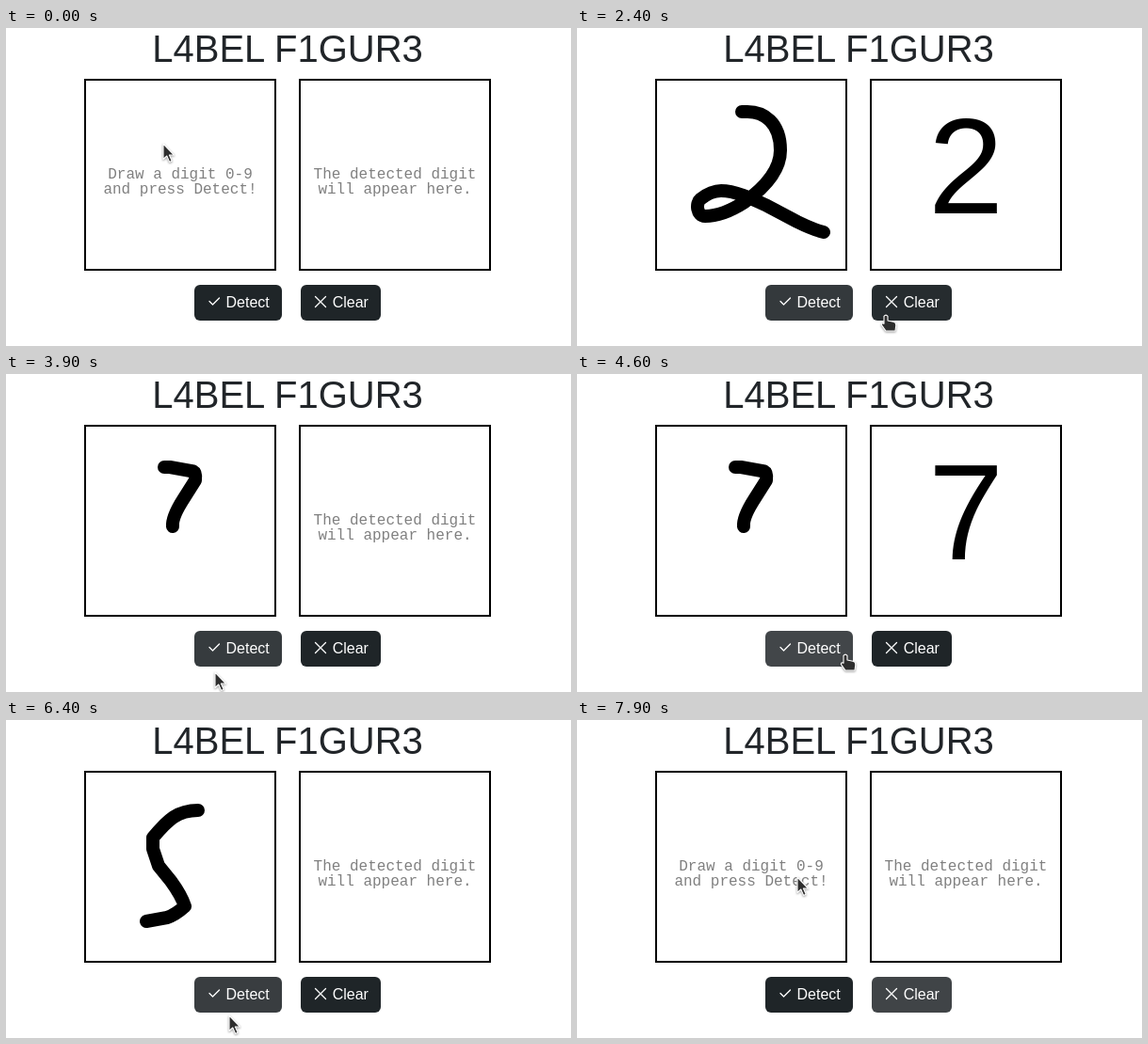
These frames come from a looping animation (600 px wide and 338 px high, 8000 ms). An HTML page:

```html
<!DOCTYPE html>
<html lang="en">
<head>
<meta charset="utf-8">
<title>Digit recognition</title>
<style>
  html, body { margin: 0; width: 100%; height: 100%; overflow: hidden; background: #fff; }
  svg { display: block; width: 100%; height: 100%; }
  text { font-family: "Liberation Sans", Arial, sans-serif; font-size: 16px; }
  .mid { text-anchor: middle; }
  .hint text { font-family: "Liberation Mono", "Courier New", monospace; fill: #808080; }
  .label { fill: #fff; }
  .icon { fill: none; stroke: #fff; stroke-width: 1.3; stroke-linecap: round; stroke-linejoin: round; }
  .box { fill: none; stroke: #000; stroke-width: 2; }
  #ink path { fill: none; stroke: #000; stroke-width: 14; stroke-linecap: round; stroke-linejoin: round; }
  #pointer path { fill: #2e2e2e; stroke: #fff; stroke-width: 1.1; stroke-linejoin: round; }
  #pointer { filter: drop-shadow(0.5px 1px 0.8px rgba(0, 0, 0, .4)); }
</style>
</head>
<body>
<svg viewBox="0 0 600 338">
  <text class="mid" x="299" y="36" fill="#212529" style="font-size:40px">L4BEL F1GUR3</text>
  <rect class="box" x="84" y="55" width="202" height="202"/>
  <rect class="box" x="312" y="55" width="202" height="202"/>

  <g id="drawHint" class="hint mid">
    <text x="185" y="160">Draw a digit 0-9</text>
    <text x="185" y="176">and press Detect!</text>
  </g>
  <g id="resultHint" class="hint mid">
    <text x="413" y="160">The detected digit</text>
    <text x="413" y="176">will appear here.</text>
  </g>
  <g id="ink"></g>
  <text id="result" class="mid" x="413" y="197" style="font-size:144px"></text>

  <rect id="detect" x="200" y="273" width="93" height="38" rx="6"/>
  <path class="icon" d="M216 290.5l3.5 3.5 7-7"/>
  <text class="label" x="233.5" y="297">Detect</text>
  <rect id="clear" x="313" y="273" width="85" height="38" rx="6"/>
  <path class="icon" d="M328.5 285.5l11 11m0-11l-11 11"/>
  <text class="label" x="346.7" y="297">Clear</text>

  <g id="pointer">
    <path id="arrow" d="M0 0V16.5L3.8 13 6.6 19.4 9.2 18.3 6.4 12H11.5Z"/>
    <path id="hand" d="M-2 1.4Q0 -1.2 2 1.4V6L8 7.3Q11 8 10.8 11L10 17H0L-4.6 10.6Q-4.8 8 -2 9.3Z"/>
  </g>
</svg>
<script>
const LOOP = 8000, STEP = 100, INK_LAG = 70, LINGER = 85, FADE = 150;
const $ = id => document.getElementById(id);
const mix = (a, b, k) => a + (b - a) * k;
const spot = (t, x, y) => ({ t, x, y });

// Each round: draw the digit, press Detect, wait, press Clear.
const rounds = [
  {
    digit: 2, start: 200, dur: 920, wait: 500, cleared: 2800,
    via: spot(1300, 254, 278), detect: spot(1800, 270, 306), clear: spot(2400, 328, 305),
    shape: "M175 89H181C198 89 216 100 216 130C216 148 203 167 178 185C164 194 150 200 136 200" +
      "C127 200 126 186 131 182C138 176 147 173 153 173C168 173 185 181 200 188L234 206Q250 214 262 217"
  },
  {
    digit: 7, start: 3115, dur: 400, wait: 0, cleared: 5400,
    via: spot(3900, 222, 317), detect: spot(4600, 285, 298), clear: spot(5000, 364, 291),
    shape: "M168 99H174L199 103.5Q202 105 201 113L189 132Q176 152 177 162"
  },
  {
    digit: 5, start: 5600, dur: 500, wait: 0, cleared: 7800,
    via: spot(6400, 237, 314), detect: spot(7100, 262, 298), clear: spot(7600, 356, 294),
    shape: "M204 96C182 96 172 106 156 125V137L162 155 175 171Q186 186 190 198Q180 207 171 210L149 214"
  }
];

// Pointer route between strokes.
const route = [spot(0, 167, 123)];
for (const r of rounds) {
  r.path = document.createElementNS("http://www.w3.org/2000/svg", "path");
  r.path.setAttribute("d", r.shape);
  $("ink").append(r.path);
  r.length = r.path.getTotalLength();
  const first = r.path.getPointAtLength(0), last = r.path.getPointAtLength(r.length);
  route.push(
    spot(r.start, first.x, first.y), spot(r.start + r.dur, last.x, last.y),
    r.via, r.detect, { ...r.detect, t: r.detect.t + r.wait },
    r.clear, { ...r.clear, t: r.cleared + LINGER });
}
route.push(spot(7900, 234, 167), spot(LOOP, 234, 167));

// Length of the stroke drawn by time t.
const drawn = (r, t) => r.length * Math.min(1, Math.max(0, (t - r.start) / r.dur));

function pointerAt(t) {
  const r = rounds.find(r => t >= r.start && t <= r.start + r.dur);
  if (r) return r.path.getPointAtLength(drawn(r, t));
  const i = route.findIndex(s => s.t > t);
  const a = route[i - 1], b = route[i], k = (t - a.t) / (b.t - a.t);
  return { x: mix(a.x, b.x, k), y: mix(a.y, b.y, k) };
}

const buttons = { detect: [200, 293], clear: [313, 398] };
const over = (p, [x0, x1]) => p.x >= x0 && p.x <= x1 && p.y >= 273 && p.y <= 311;

// Hover colour follows the share of recent time spent over the button.
function shade(t, span) {
  let hits = 0;
  for (let s = 5; s < FADE; s += 10) hits += over(pointerAt(Math.max(0, t - s)), span);
  const k = hits / (FADE / 10);
  return `rgb(${mix(31, 66, k)}, ${mix(37, 70, k)}, ${mix(40, 73, k)})`;
}

const show = (el, on) => el.setAttribute("visibility", on ? "visible" : "hidden");

function render(t) {
  const now = rounds.find(r => t >= r.start && t < r.cleared);
  const answered = !!now && t >= now.detect.t;
  show($("drawHint"), !now);
  show($("resultHint"), !answered);
  $("result").textContent = answered ? now.digit : "";
  for (const r of rounds) {
    show(r.path, r === now);
    r.path.setAttribute("stroke-dasharray", `${drawn(r, t - INK_LAG) + 0.01} ${r.length + 20}`);
  }

  const p = pointerAt(t);
  let onButton = false;
  for (const id in buttons) {
    $(id).setAttribute("fill", shade(t, buttons[id]));
    onButton = onButton || over(p, buttons[id]);
  }
  show($("hand"), onButton);
  show($("arrow"), !onButton);
  $("pointer").setAttribute("transform", `translate(${p.x} ${p.y})`);
}

const begin = performance.now();
function tick() {
  const t = (performance.now() - begin) % LOOP;
  render(Math.floor(t / STEP) * STEP);
  requestAnimationFrame(tick);
}
tick();
</script>
</body>
</html>
```
